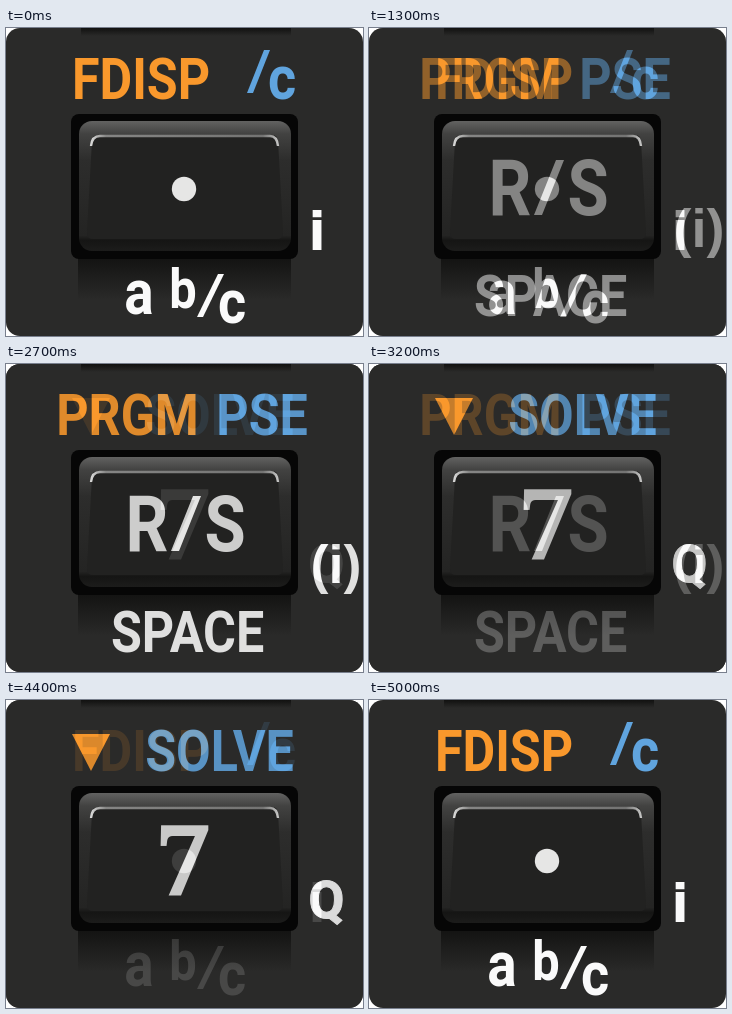
Write an HTML page that moves like this. It is 357 px wide and 308 px high and loops after 5.1 s.

```html
<!DOCTYPE html>
<html lang="en">
<head>
<meta charset="utf-8">
<title>Calculator key</title>
<style>
  html, body { margin: 0; width: 100%; height: 100%; overflow: hidden; background: #fff; }
  svg { display: block; width: 100vw; height: 100vh; }
  text { text-anchor: middle; font-weight: 700; }
  .label { font-family: Roboto, "Liberation Sans", sans-serif; }
  .side { font-family: "Liberation Sans", Arial, sans-serif; stroke-linejoin: miter; }
  .digit { font-family: "Noto Serif", "Liberation Serif", serif; }
  .orange { fill: #f9982c; }
  .blue { fill: #60a4de; }
  .white { fill: #fafafa; }
  .cap { fill: #e6e6e5; }
  #keyB, #keyC { opacity: 0; }
</style>
</head>
<body>
<svg viewBox="0 0 357 308">
  <defs>
    <linearGradient id="shade" x2="0" y2="1">
      <stop stop-color="#111110"/>
      <stop offset="1" stop-color="#2a2a29"/>
    </linearGradient>
    <linearGradient id="body" x2="0" y2="1">
      <stop stop-color="#626261"/>
      <stop offset=".1" stop-color="#424241"/>
      <stop offset=".3" stop-color="#2d2d2c"/>
      <stop offset=".88" stop-color="#242423"/>
      <stop offset=".92" stop-color="#151514"/>
      <stop offset="1" stop-color="#1c1c1b"/>
    </linearGradient>
    <linearGradient id="shine">
      <stop stop-color="#d8d8d7"/>
      <stop offset=".08" stop-color="#858584"/>
      <stop offset=".92" stop-color="#747473"/>
      <stop offset="1" stop-color="#c4c4c3"/>
    </linearGradient>
    <g id="base">
      <rect width="357" height="308" rx="14" fill="#2a2a29"/>
      <rect x="75" width="210" height="8" fill="url(#shade)"/>
      <rect x="72" y="226" width="213" height="46" fill="url(#shade)"/>
      <rect x="65" y="86" width="227" height="145" rx="8" fill="#060606"/>
      <rect x="73" y="93" width="212" height="130" rx="13" fill="url(#body)"/>
      <path d="M92 107H266Q272 107 272 113L277 205Q277 211 271 211H87Q81 211 81 205L86 113Q86 107 92 107Z" fill="#222221"/>
      <path d="M85 118Q86 108 94 108H264Q271 108 272 118" fill="none" stroke="url(#shine)" stroke-width="2.4"/>
    </g>
  </defs>

  <g id="keyA">
    <use href="#base"/>
    <text class="label orange" transform="translate(135 71) scale(.87 1)" font-size="57.7">FDISP</text>
    <path class="blue" d="M241 65L258 22H264L247 65Z"/>
    <text class="label blue" transform="translate(276 71) scale(.87 1)" font-size="62">c</text>
    <circle class="cap" cx="178" cy="161" r="12.2"/>
    <text class="side white" x="311" y="221" font-size="51" stroke="#fafafa" stroke-width="1.8">i</text>
    <text class="label white" transform="translate(133 286) scale(.87 1)" font-size="63">a</text>
    <text class="label white" transform="translate(177 280) scale(.87 1)" font-size="56">b</text>
    <path class="white" d="M191 289L212 246H218L197 289Z"/>
    <text class="label white" transform="translate(226 295) scale(.87 1)" font-size="62">c</text>
  </g>

  <g id="keyB">
    <use href="#base"/>
    <text class="label orange" transform="translate(121.5 70.5) scale(.87 1)" font-size="57.7">PRGM</text>
    <text class="label blue" transform="translate(256 70.5) scale(.87 1)" font-size="57.7">PSE</text>
    <text class="label cap" transform="translate(141 187) scale(.87 1)" font-size="77">R</text>
    <path class="cap" d="M165 187L187 132H195L173 187Z"/>
    <text class="label cap" transform="translate(219 187) scale(.87 1)" font-size="77">S</text>
    <text class="side white" x="330" y="219" font-size="54">(i)</text>
    <text class="label white" transform="translate(181.5 287.5) scale(.87 1)" font-size="57.7">SPACE</text>
  </g>

  <g id="keyC">
    <use href="#base"/>
    <path class="orange" d="M66 34H104L85 71Z"/>
    <text class="label blue" transform="translate(213.5 70.5) scale(.87 1)" font-size="57.7">SOLVE</text>
    <text class="digit cap" x="178" y="196" font-size="99">7</text>
    <text class="label white" x="320.5" y="218" font-size="52" stroke="#fafafa" stroke-width="1">Q</text>
  </g>
</svg>
<script>
  const LOOP = 5100, STEP = 100;

  // Stepped fade: [time, opacity] pairs, ending at opacity `to`
  const fade = (start, count, from, to) =>
    Array.from({ length: count }, (_, i) =>
      [start + i * STEP, from + (to - from) * (i + 1) / count]);

  function play(id, steps) {
    const frames = [[0, 0], ...steps, [LOOP, 0]].map(([time, opacity]) =>
      ({ offset: time / LOOP, opacity, easing: 'steps(1, end)' }));
    return document.getElementById(id).animate(frames, { duration: LOOP, iterations: Infinity });
  }

  const start = document.timeline.currentTime;
  const runs = [
    play('keyB', [...fade(1000, 8, 0, 1), [3400, 0]]),
    play('keyC', [...fade(2700, 8, 0, 1), ...fade(4400, 7, 1, 0)])
  ];
  runs.forEach(run => { run.startTime = start; });
</script>
</body>
</html>
```
